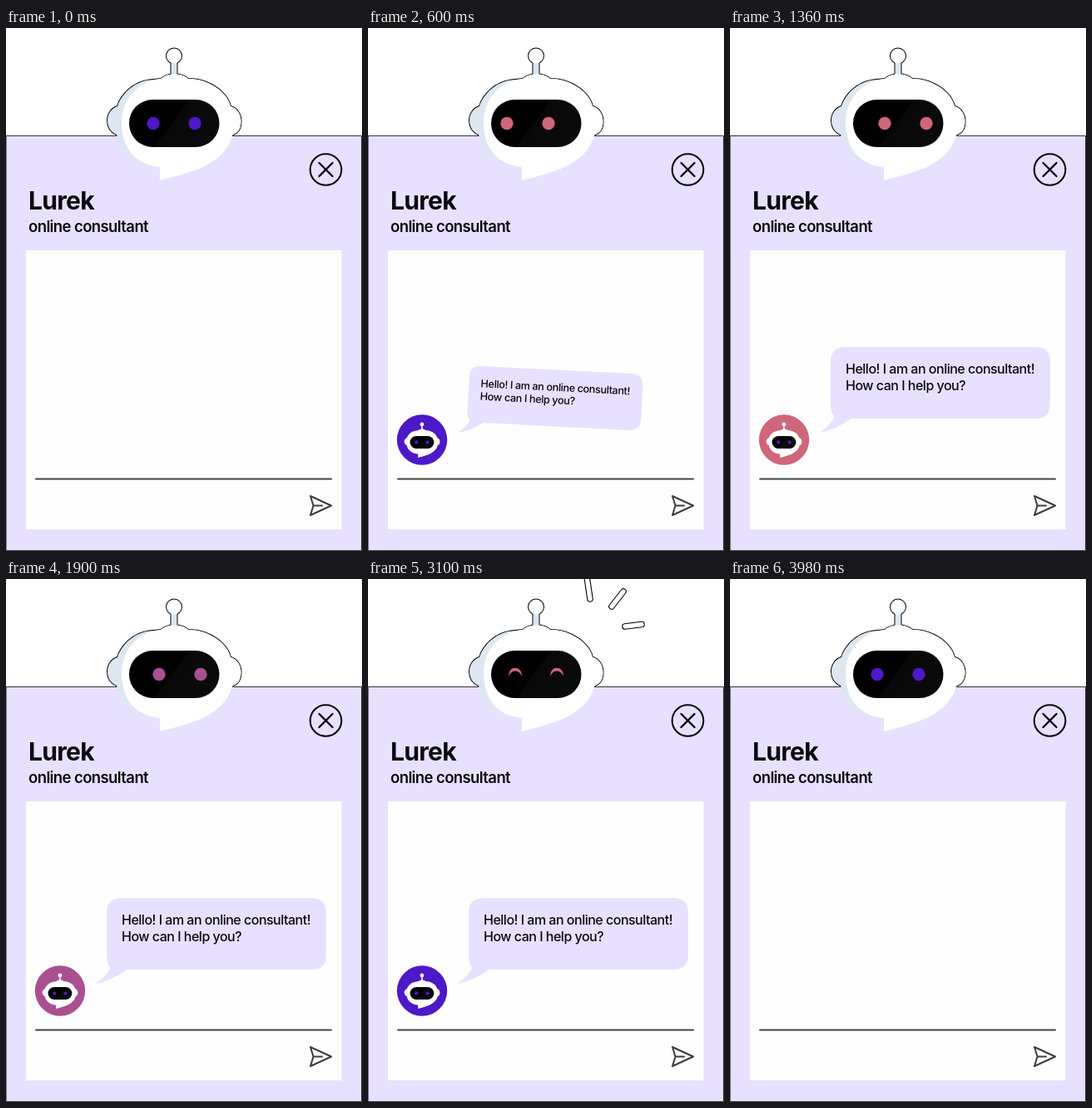
Recreate the animation shown at these times as an HTML page with a canvas. Size 428x628 px, loop 4000 ms.

```html
<!DOCTYPE html>
<html lang="en">
<head>
<meta charset="utf-8">
<title>Chat assistant</title>
<style>
  html, body { margin: 0; width: 100%; height: 100%; overflow: hidden; background: #fff; }
  canvas { display: block; width: 428px; height: 628px; }
</style>
</head>
<body>
<canvas id="stage"></canvas>
<script>
const W = 428, H = 628, LOOP = 4000;
const PURPLE = [77, 24, 200], PINK = [208, 102, 121];
const LILAC = '#e8e0ff', SHADE = '#dde7f1', INK = '#0a0a0f';
const FONT = 'Inter, "Liberation Sans", sans-serif';

const canvas = document.getElementById('stage');
const ctx = canvas.getContext('2d');
const dpr = window.devicePixelRatio || 1;
canvas.width = W * dpr;
canvas.height = H * dpr;

const clamp = v => Math.max(0, Math.min(1, v));
const span = (t, a, b) => clamp((t - a) / (b - a));
const mix = (a, b, p) => a + (b - a) * p;
const sine = u => (1 - Math.cos(Math.PI * u)) / 2;
const cubic = u => u < .5 ? 4 * u ** 3 : 1 - 4 * (1 - u) ** 3;
const easeOut = u => 1 - (1 - u) ** 3;
const blend = p => `rgb(${PURPLE.map((c, i) => Math.round(mix(c, PINK[i], p)))})`;

// Robot silhouette
const head = new Path2D(`M134 94 C138 81 152 65 172 62.5 Q181 61.5 186 61
  C191 57 196 55.5 202 55.5 C209 55.5 215 57 219 61 Q230 61 238 64
  C255 70 267 81 270 94 C278 96 282.5 104 282.5 112 C282.5 121 279 126 272.5 128
  C268 146 254 160 232 169 Q210 177 185 183 L185 167
  C159 167 138 152 133 128 C126 125 122 119 122 111 C122 103 127 96 134 94 Z`);
const frontFace = new Path2D(`M186 61 C191 57 196 55.5 202 55.5 C209 55.5 215 57 219 61
  Q230 61 238 64 C255 70 267 81 270 94 C278 96 282.5 104 282.5 112
  C282.5 121 279 126 272.5 128 C268 146 254 160 232 169 Q210 177 185 183 L185 167
  C154 164 139 143 139 113 C139 86 158 64 186 61 Z`);
const stem = new Path2D('M198.5 41 H205.5 V58 H198.5 Z');
const knob = new Path2D();
knob.arc(202, 33.5, 9, 0, Math.PI * 2);
const visor = new Path2D();
visor.roundRect(148, 86, 108.5, 57, 28.5);

const bubble = new Path2D(`M139 383 H367 Q385 383 385 401 V451 Q385 469 367 469 H145
  C135 477 122 483 108 486 C116 480 122 474 125.5 467 Q121 462 121 452
  V401 Q121 383 139 383 Z`);
const plane = new Path2D('M366 562 L391 573.5 L366 585 L369.5 573.5 Z M369.5 573.5 H380');
const sparks = [[267, 24, 263, -3], [293, 33, 307, 15], [309, 57, 329, 54.5]];

function disc(x, y, r, fill) {
  ctx.beginPath();
  ctx.arc(x, y, r, 0, Math.PI * 2);
  ctx.fillStyle = fill;
  ctx.fill();
}

function line(x1, y1, x2, y2, width, color) {
  ctx.beginPath();
  ctx.moveTo(x1, y1);
  ctx.lineTo(x2, y2);
  ctx.lineWidth = width;
  ctx.strokeStyle = color;
  ctx.stroke();
}

function text(str, x, y, size, weight, spacing) {
  ctx.font = `${weight} ${size}px ${FONT}`;
  ctx.letterSpacing = spacing + 'px';
  ctx.fillStyle = INK;
  ctx.fillText(str, x, y);
}

function fill(path, color) {
  ctx.fillStyle = color;
  ctx.fill(path);
}

// Runs draw() inside a translate-rotate-scale around a pivot
function around(x, y, scale, angle, draw) {
  ctx.save();
  ctx.translate(x, y);
  ctx.rotate(angle);
  ctx.scale(scale, scale);
  ctx.translate(-x, -y);
  draw();
  ctx.restore();
}

function drawPanel() {
  ctx.fillStyle = LILAC;
  ctx.fillRect(0, 129, W, H - 129);
  ctx.lineWidth = 1;
  ctx.strokeStyle = '#33313a';
  ctx.strokeRect(.5, 129.5, W - 1, H - 130);
  ctx.fillStyle = '#fefefe';
  ctx.fillRect(24, 267, 379.5, 335);

  text('Lurek', 27, 217.5, 30, 700, -.7);
  text('online consultant', 27, 245, 18.5, 600, -.6);

  ctx.lineCap = ctx.lineJoin = 'round';
  ctx.beginPath();
  ctx.arc(384.5, 170, 18.8, 0, Math.PI * 2);
  ctx.lineWidth = 2.1;
  ctx.strokeStyle = INK;
  ctx.stroke();
  line(376.5, 162, 392.5, 178, 2.4, INK);
  line(392.5, 162, 376.5, 178, 2.4, INK);

  line(36, 541.5, 391, 541.5, 2, '#444');
  ctx.lineWidth = 2;
  ctx.strokeStyle = '#3c3c40';
  ctx.stroke(plane);
}

function drawBody(outlined) {
  if (outlined) {
    ctx.save();
    ctx.beginPath();
    ctx.rect(0, 0, W, 129);
    ctx.clip();
    ctx.lineWidth = 2;
    ctx.strokeStyle = '#000';
    [stem, knob, head].forEach(p => ctx.stroke(p));
    ctx.restore();
  }
  fill(stem, SHADE);
  fill(knob, '#fff');
  fill(head, outlined ? SHADE : '#f4f6fc');
  fill(frontFace, '#fff');
  const sheen = ctx.createLinearGradient(182, 98, 222, 128);
  sheen.addColorStop(.45, '#000');
  sheen.addColorStop(.5, '#080808');
  sheen.addColorStop(1, '#0a0a0a');
  fill(visor, sheen);
}

// An eye is a disc with a round bite taken out of it
function drawEye(x, color, biteY, biteR) {
  const y = 114.5;
  ctx.save();
  ctx.beginPath();
  ctx.rect(x - 12, y - 12, 24, 24);
  ctx.moveTo(x + biteR, y + biteY);
  ctx.arc(x, y + biteY, biteR, 0, Math.PI * 2);
  ctx.clip('evenodd');
  disc(x, y, 7.7, color);
  ctx.restore();
}

function drawEyes(t) {
  const x = 177
    - 10 * cubic(span(t, 0, 360))
    + 19 * cubic(span(t, 880, 1210))
    - 9 * cubic(span(t, 1620, 2360));
  const pink = sine(span(t, 0, 360)) - sine(span(t, 1620, 2400))
    + sine(span(t, 2760, 3100)) - sine(span(t, 3700, 3980));
  const lid = sine(span(t, 600, 780)) - sine(span(t, 860, 1040));
  const smile = sine(span(t, 2760, 3100)) - sine(span(t, 3700, 3980));
  for (const eye of [x, x + 50]) {
    if (smile > .001) drawEye(eye, blend(pink), mix(15.4, 3.6, smile), 7.6);
    else if (lid > .001) drawEye(eye, blend(pink), mix(-15.8, -5, lid), 8);
    else disc(eye, 114.5, 7.7, blend(pink));
  }
}

function drawSparks(t) {
  const grow = easeOut(span(t, 2760, 3100));
  if (!grow) return;
  for (const [x1, y1, x2, y2] of sparks) {
    const x = mix(x1, x2, grow), y = mix(y1, y2, grow);
    line(x1, y1, x, y, 7.6, '#000');
    line(x1, y1, x, y, 5.4, '#fff');
  }
}

function drawAvatar(t) {
  const scale = t < 290
    ? 1.115 * sine(span(t, 0, 290))
    : mix(1.115, 1, sine(span(t, 290, 620)));
  if (scale < .005) return;
  const pink = t < 1360 ? 0 : 1 - sine(span(t, 1620, 2400));
  around(65, 494.5, scale, 0, () => {
    disc(65, 494.5, 30.2, blend(pink));
    ctx.translate(65, 497.5);
    ctx.scale(.266, .266);
    ctx.translate(-202.5, -114.5);
    drawBody(false);
    disc(177, 114.5, 8, blend(0));
    disc(227, 114.5, 8, blend(0));
  });
}

function drawBubble(t) {
  if (t < 290) return;
  const p = t > 1080 ? 1 : 1 - Math.exp(-(((t - 267) / 267) ** 2));
  const tilt = (1 - p) * 14 * Math.PI / 180;
  around(108, 486, p, tilt, () => {
    fill(bubble, LILAC);
    text('Hello! I am an online consultant!', 139, 415, 16, 500, -.5);
    text('How can I help you?', 139, 434.5, 16, 500, -.5);
  });
}

function render(t) {
  ctx.setTransform(dpr, 0, 0, dpr, 0, 0);
  ctx.fillStyle = '#fff';
  ctx.fillRect(0, 0, W, H);
  drawPanel();
  drawBody(true);
  drawEyes(t);
  ctx.globalAlpha = 1 - span(t, 3700, 3980);
  drawSparks(t);
  drawBubble(t);
  drawAvatar(t);
  ctx.globalAlpha = 1;
}

const start = performance.now();
function tick() {
  render((performance.now() - start) % LOOP);
  requestAnimationFrame(tick);
}
tick();
</script>
</body>
</html>
```
